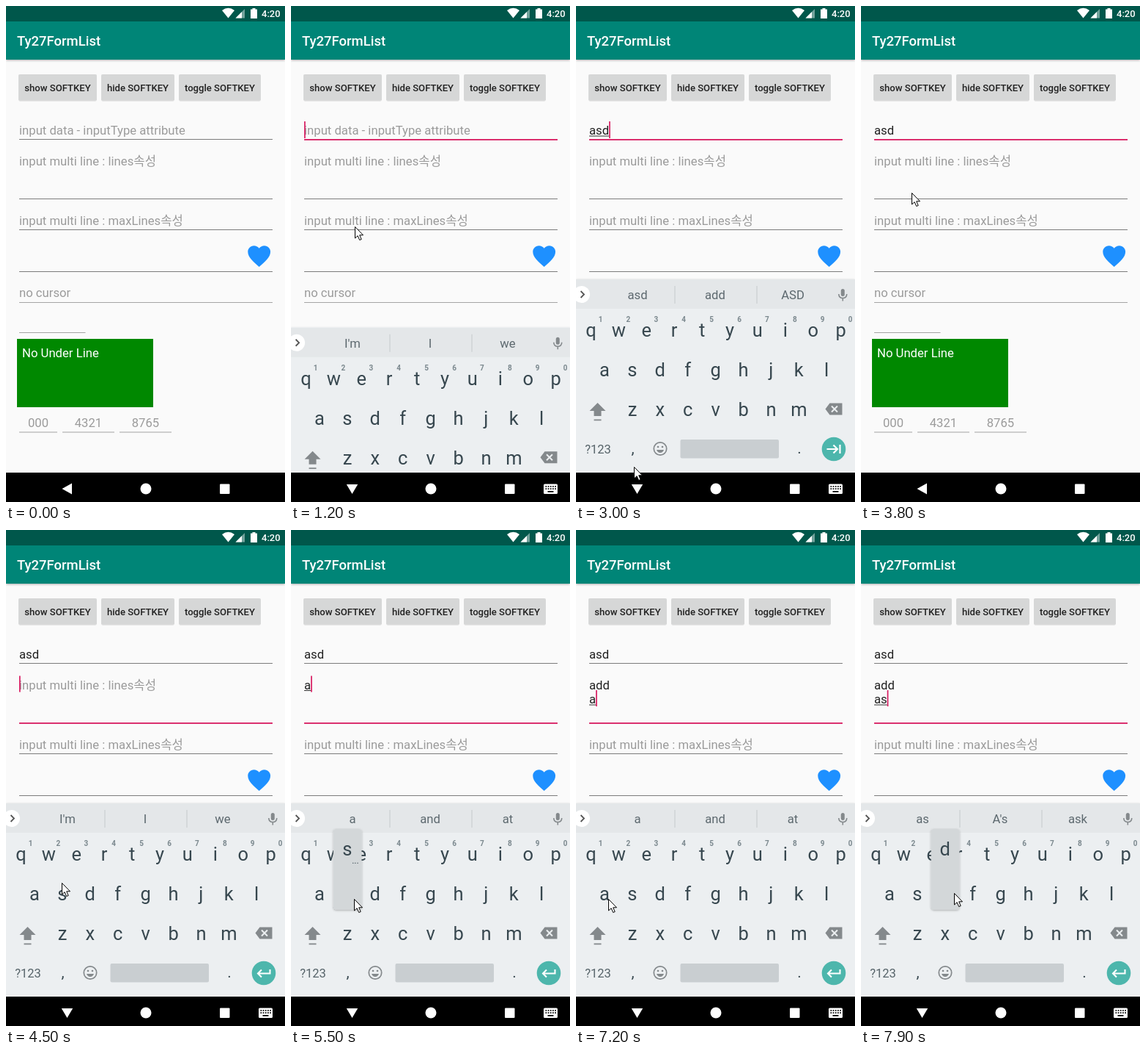
Recreate the animation shown at these times as an HTML page. Size 381 by 675 pixels, loop 8000 ms.

```html
<!DOCTYPE html>
<html lang="ko">
<head>
<meta charset="utf-8">
<title>Text fields</title>
<style>
  html, body { margin: 0; width: 100%; height: 100%; overflow: hidden; background: #fafafa; }
  svg { display: block; width: 381px; height: 675px; }
  text { font-family: Roboto, 'Noto Sans CJK KR', 'Noto Sans CJK', sans-serif; font-size: 16.7px; white-space: pre; }
  .mid { text-anchor: middle; }
  .hint { fill: #9b9b9b; }
  .typed { fill: #212121; }
  .medium { font-weight: 500; }
  .key { font-size: 25.5px; fill: #37474f; text-anchor: middle; }
  .digit { font-size: 10px; font-weight: 700; fill: #7b888e; text-anchor: middle; }
  .word { fill: #5d696f; text-anchor: middle; }
  .word.best { fill: #000; font-weight: 700; }
</style>
</head>
<body>
<svg id="stage" viewBox="0 0 381 675" xmlns="http://www.w3.org/2000/svg"></svg>
<script>
const LOOP = 8000;
const PINK = '#d81b60', GREY = '#7c7c7c';
const stage = document.getElementById('stage');
const $ = id => document.getElementById(id);

const rect = (x, y, w, h, fill, extra = '') =>
  `<rect x="${x}" y="${y}" width="${w}" height="${h}" fill="${fill}" ${extra}/>`;
const text = (x, y, s, cls = '', extra = '') =>
  `<text x="${x}" y="${y}" class="${cls}" ${extra}>${s}</text>`;
const path = (d, fill, extra = '') => `<path d="${d}" fill="${fill}" ${extra}/>`;
const stroke = (d, color, width, extra = '') =>
  path(d, 'none', `stroke="${color}" stroke-width="${width}" ${extra}`);

// Letter positions, shared by the keyboard and its key popups
const keys = {};
[['qwertyuiop', 20.5, 450], ['asdfghjkl', 39, 504], ['zxcvbnm', 77, 558]].forEach(([row, x0, y]) =>
  [...row].forEach((ch, i) => { keys[ch] = [x0 + i * 37.9, y]; }));

function statusBar() {
  return rect(0, 0, 381, 21, '#00574b')
    + path('M295 6 Q303.500 -.5 312 6 L303.500 16.500 Z', '#fff')
    + path('M313.500 16.500 L326 4 V16.500 Z', '#fff', 'opacity=".45"')
    + path('M313.500 16.500 L322 8 V16.500 Z', '#fff')
    + path('M334 4.500 H336.500 V3 H340.500 V4.500 H343 V17 H334 Z', '#fff')
    + text(349, 15, '4:20', 'medium', 'fill="#fff" style="font-size:13px"');
}

function button(x, w, label) {
  return rect(x, 93, w, 35.5, '#d6d7d7', 'rx="2" filter="url(#soft)"')
    + text(x + w / 2, 115.5, label, 'mid medium', 'fill="#212121" style="font-size:13.1px"');
}

function page() {
  const line = (x, y, w, id = '') => rect(x, y, w, 1, GREY, id && `id="${id}"`);
  const small = (x, w, label) =>
    text(x + w / 2, 573, label, 'hint mid') + rect(x, 579.5, w, 1, '#a4a4a4');
  return rect(0, 0, 381, 675, '#fafafa')
    + rect(0, 21, 381, 52, '#008577', 'filter="url(#drop)"')
    + statusBar()
    + text(15, 54, 'Ty27FormList', 'medium', 'fill="#fff" style="font-size:18.500px"')
    + button(17, 107, 'show SOFTKEY') + button(130, 100, 'hide SOFTKEY') + button(236, 112, 'toggle SOFTKEY')
    + text(18, 175, 'input data - inputType attribute', 'hint', 'id="hint1"')
    + text(18, 175, '', 'typed', 'id="one"') + line(18, 181, 346, 'line1')
    + text(18, 216.5, 'input multi line : lines속성', 'hint', 'id="hint2"')
    + text(18, 216.5, '', 'typed', 'id="two"') + text(18, 236, '', 'typed', 'id="three"')
    + line(18, 262, 346, 'line2')
    + rect(18, 0, 0, 1, '#333', 'id="compose"') + rect(18, 0, 1.7, 23, PINK, 'id="caret"')
    + text(18, 297.5, 'input multi line : maxLines속성', 'hint') + line(18, 304, 346)
    + path('M345.700 355 C338 348 330.300 342 330.300 334.500 C330.300 330 333.800 326.300 338.600 326.300 C341.400 326.300 344 327.700 345.700 329.800 C347.400 327.700 350 326.300 352.800 326.300 C357.600 326.300 361.100 330 361.100 334.500 C361.100 342 353.400 348 345.700 355 Z', '#1e90ff')
    + line(18, 361, 346)
    + text(18, 396, 'no cursor', 'hint') + rect(18, 403, 346, 1, '#a4a4a4')
    + rect(18, 444, 90.5, 1, '#a4a4a4')
    + rect(15, 453, 186, 93, '#008800') + text(22, 478, 'No Under Line', '', 'fill="#fff"')
    + small(18, 52, '000') + small(77, 71, '4321') + small(155, 71, '8765');
}

function keyboard() {
  let s = rect(0, 372, 381, 263, '#eceff1', 'filter="url(#drop)"') + rect(0, 372, 381, 40, '#e4e7e9')
    + '<circle cx="7.500" cy="392.500" r="11.500" fill="#fff"/>'
    + stroke('M6.500 388 L11 392.500 L6.500 397', '#555', 1.8)
    + rect(134.5, 381, 1, 24, '#c3c9cc') + rect(246.5, 381, 1, 24, '#c3c9cc');
  [84, 190, 296].forEach((x, i) => { s += text(x, 399, '', 'word', `id="word${i}"`); });
  s += rect(361.8, 385, 5, 10, '#84898c', 'rx="2.500"')
    + stroke('M358.800 392 Q359 397.500 364.300 397.500 Q369.600 397.500 369.800 392 M364.300 397.500 V401.500', '#84898c', 1.6);
  for (const ch in keys) s += text(keys[ch][0], keys[ch][1], ch, 'key');
  [...'1234567890'].forEach((d, i) => { s += text(33.5 + i * 37.9, 430, d, 'digit'); });
  s += path('M29.500 540 L40.500 551 H34.500 V558 H24.500 V551 H18.500 Z', '#84898c')
    + rect(24.5, 562.5, 10, 1.8, '#84898c')
    + path('M340.500 548.500 L346.500 540.500 H363.500 V556.500 H346.500 Z', '#84898c')
    + stroke('M349 544.500 L357 552.500 M357 544.500 L349 552.500', '#eceff1', 2)
    + text(30, 608.5, '?123', 'mid', 'fill="#566369" style="font-size:16.500px"')
    + text(77.5, 609, ',', 'key', 'style="font-size:21px"') + text(305, 609, '.', 'key', 'style="font-size:21px"')
    + '<circle cx="115" cy="602.500" r="8.700" fill="none" stroke="#84898c" stroke-width="1.700"/>'
    + '<circle cx="112" cy="600" r="1.300" fill="#84898c"/><circle cx="118" cy="600" r="1.300" fill="#84898c"/>'
    + path('M110 604 H120 Q118.500 608 115 608 Q111.500 608 110 604 Z', '#84898c')
    + rect(142.5, 590, 134.5, 25.5, '#c9ced1', 'rx="2"')
    + '<circle cx="352" cy="603" r="16.300" fill="#4db6ac"/>'
    + stroke('M342.500 603 H357 M351.500 597.500 L357 603 L351.500 608.500 M360.500 597 V609', '#fff', 2.2, 'id="tabIcon"')
    + stroke('M360.500 598 V603.500 H344 M349 598.500 L344 603.500 L349 608.500', '#fff', 2.1, 'id="enterIcon"');
  return `<g id="keyboard">${s}</g>`;
}

function popup() {
  return '<g id="popup">' + rect(-19, 407, 38.5, 109.5, '#d3d7d9', 'rx="4" filter="url(#drop)"')
    + text(0, 442.5, '', 'key', 'id="popKey"')
    + text(11, 454, '...', 'mid', 'id="dots" fill="#37474f" style="font-size:12px"') + '</g>';
}

function navBar() {
  let dots = '';
  for (let i = 0; i < 10; i++) dots += rect(347.5 + (i % 5) * 3.2, 653 + (i > 4 ? 3.2 : 0), 1.7, 1.7, '#000');
  return rect(0, 635, 381, 40, '#000')
    + path('M76.500 657 L90 649.500 V664.500 Z', '#fff', 'id="back"')
    + path('M75.800 651 H91.200 L83.500 664 Z', '#fff', 'id="down"')
    + '<circle cx="191" cy="657" r="7.500" fill="#fff"/>'
    + rect(292, 650.5, 13.5, 13.5, '#fff', 'rx="1"')
    + '<g id="switcher">' + rect(345, 650.5, 19, 13.5, '#fff', 'rx="1.500"') + dots
    + rect(350.5, 660, 8, 1.7, '#000') + '</g>';
}

stage.innerHTML = `<defs>
  <filter id="drop" x="-20%" y="-20%" width="140%" height="140%"><feDropShadow dx="0" dy="1" stdDeviation="1.500" flood-opacity=".32"/></filter>
  <filter id="soft" x="-5%" y="-10%" width="110%" height="125%"><feDropShadow dx="0" dy=".6" stdDeviation=".7" flood-opacity=".25"/></filter>
  </defs>` + page() + keyboard() + popup() + navBar()
  + path('M0 0 V15.500 L3.600 12.200 L6.200 18 L8.700 17 L6.200 11.300 H11 Z', '#fff',
    'id="mouse" stroke="#000" stroke-width="1" stroke-linejoin="round"');

// Pointer tip: time, x, y
const pointer = [
  [100, 366, 77], [400, 114, 177], [900, 114, 177], [1700, 43, 505], [1900, 42, 510],
  [2000, 42, 510], [2200, 82, 505], [2300, 82, 505], [2500, 120, 500], [2700, 120, 500],
  [3000, 79, 627], [3200, 81, 652], [3500, 80, 650], [3800, 69, 254], [3900, 67, 230],
  [4100, 67, 226], [4500, 76, 480], [4800, 43, 503], [5000, 43, 503], [5300, 86, 502],
  [5700, 86, 502], [5900, 122, 500], [6000, 122, 500], [6300, 371, 603], [6500, 371, 603],
  [6900, 44, 502], [7200, 44, 502], [7400, 86, 501], [7500, 86, 501], [7700, 127, 494]
];
// Share of the keyboard that is up
const rise = [[900, 0], [1300, 1], [3200, 1], [3600, 0], [4000, 0], [4400, 1]];
const presses = [
  [1900, 2000, 'a'], [2200, 2300, 's'], [2500, 2600, 'd'],
  [4800, 5000, 'a'], [5500, 5700, 's'], [5900, 6000, 'd'],
  [7100, 7200, 'a'], [7400, 7500, 's'], [7900, 8000, 'd']
];
const words = {
  none: "I'm,I,we", a: 'a,and,at', as: "as,A's,ask", asd: 'asd,add,ASD', fix: 'asd,*add,address'
};
// time, focused row, row contents, suggestions, caret shown, word being composed
const states = [
  [0, 0, ['', '', ''], 'none', 0, 0],
  [700, 1, ['', '', ''], 'none', 1, 0],
  [2000, 1, ['a', '', ''], 'a', 1, 1],
  [2300, 1, ['as', '', ''], 'as', 1, 1],
  [2600, 1, ['asd', '', ''], 'asd', 1, 1],
  [3300, 1, ['asd', '', ''], 'asd', 1, 0],
  [3700, 1, ['asd', '', ''], 'none', 0, 0],
  [4000, 2, ['asd', '', ''], 'none', 1, 0],
  [5000, 2, ['asd', 'a', ''], 'a', 1, 1],
  [5700, 2, ['asd', 'as', ''], 'as', 1, 1],
  [6000, 2, ['asd', 'asd', ''], 'fix', 1, 1],
  [6500, 3, ['asd', 'add', ''], 'none', 1, 0],
  [7200, 3, ['asd', 'add', 'a'], 'a', 1, 1],
  [7500, 3, ['asd', 'add', 'as'], 'as', 1, 1]
];

function along(track, t) {
  const next = track.findIndex(k => k[0] > t);
  if (next < 0) return track[track.length - 1].slice(1);
  if (next === 0) return track[0].slice(1);
  const a = track[next - 1], b = track[next], p = (t - a[0]) / (b[0] - a[0]);
  return a.slice(1).map((v, i) => v + (b[i + 1] - v) * p);
}
const show = (id, on) => { $(id).style.display = on ? '' : 'none'; };
const set = (id, attrs) => { for (const k in attrs) $(id).setAttribute(k, attrs[k]); };
const move = (id, x, y) => set(id, { transform: `translate(${x} ${y})` });

function drawFields(t) {
  const [, focus, rows, sugg, caret, composing] = states.filter(s => s[0] <= t).pop();
  const ids = ['one', 'two', 'three'], base = [175, 216.5, 236];
  ids.forEach((id, i) => { $(id).textContent = rows[i]; });
  show('hint1', !rows[0]);
  show('hint2', !rows[1]);
  set('line1', focus === 1 ? { fill: PINK, height: 1.8 } : { fill: GREY, height: 1 });
  set('line2', focus > 1 ? { fill: PINK, height: 1.8 } : { fill: GREY, height: 1 });
  show('caret', caret);
  show('compose', composing);
  if (focus) {
    const r = focus - 1;
    const w = rows[r] ? $(ids[r]).getComputedTextLength() : 0;
    set('caret', { x: 18 + w, y: base[r] - 18, height: r ? 22 : 23 });
    set('compose', { width: w, y: base[r] + 1.5 });
  }
  words[sugg].split(',').forEach((w, i) => {
    $('word' + i).textContent = w.replace('*', '');
    $('word' + i).classList.toggle('best', w[0] === '*');
  });
  show('tabIcon', focus < 2);
  show('enterIcon', focus > 1);
}

function draw(time) {
  const t = Math.floor(time / 100) * 100;
  drawFields(t);

  const [up] = along(rise, t);
  show('keyboard', up > 0);
  move('keyboard', 0, 263 * (1 - up));
  show('back', up === 0);
  show('down', up > 0);
  show('switcher', up > 0);

  const press = presses.find(p => t >= p[0] && t < p[1]);
  show('popup', press);
  if (press) {
    $('popKey').textContent = press[2];
    show('dots', press[2] !== 'd');
    move('popup', keys[press[2]][0], 0);
  }

  show('mouse', t >= 100);
  const [x, y] = along(pointer, t);
  move('mouse', Math.round(x) + 0.5, Math.round(y) + 0.5);
}

const start = performance.now();
function tick() {
  draw((performance.now() - start) % LOOP);
  requestAnimationFrame(tick);
}
tick();
</script>
</body>
</html>
```
